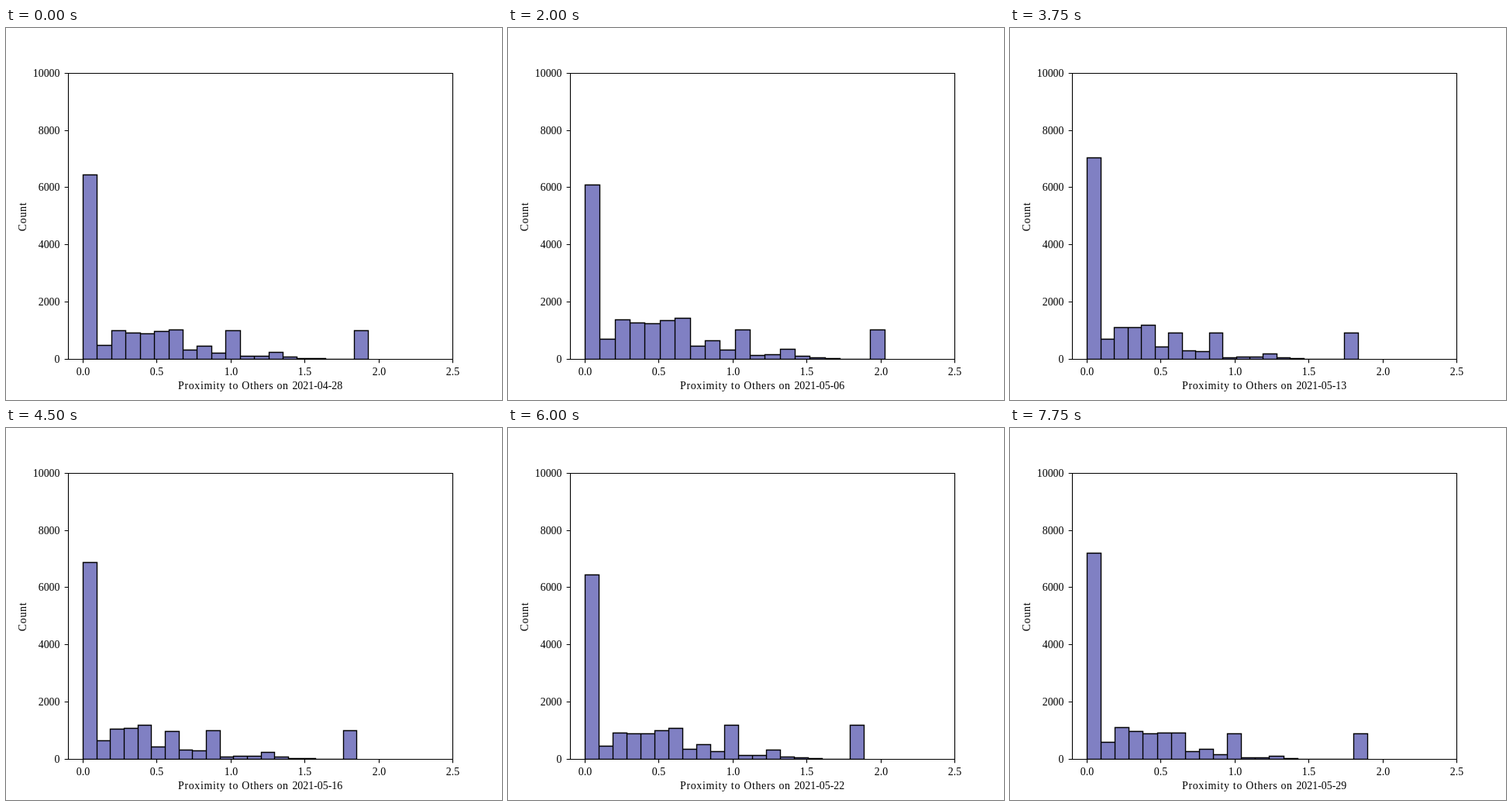
Write an HTML page that moves like this. It is 640 px wide and 480 px high and loops after 8 s.

```html
<!DOCTYPE html>
<html lang="en">
<head>
<meta charset="utf-8">
<title>Proximity histogram</title>
<style>
  html, body { margin: 0; width: 640px; height: 480px; overflow: hidden; background: #fff; }
  svg { display: block; }
  text { font: 13.9px "Liberation Serif", serif; fill: #000; }
  .words { letter-spacing: .049em; }
  .axis { fill: none; stroke: #000; stroke-width: 1.11; }
  .bars { fill: #8080c3; stroke: #000; stroke-width: 1.39; }
</style>
</head>
<body>
<svg width="640" height="480" viewBox="0 0 640 480">
  <clipPath id="plot"><rect x="80" y="57.6" width="496" height="369.6"/></clipPath>
  <g clip-path="url(#plot)"><path id="bars" class="bars"/></g>
  <path id="axis" class="axis"/>
  <g id="labels"></g>
  <text class="words" x="222" y="466">Proximity to Others on</text>
  <text id="date" x="369.4" y="466"></text>
  <text class="words" text-anchor="middle" transform="translate(25.5 243.5) rotate(-90)">Count</text>
</svg>
<script>
const STEP = 250, DAYS = 32, BINS = 20;
const START = Date.UTC(2021, 3, 28);

// Shape of the bins between the first one and the echo at half range
const WIDE = [510, 1010, 930, 920, 985, 1050, 335, 470, 235];
const NARROW = [650, 1060, 1090, 1200, 450, 970, 335, 300];

// gain scales the middle bins, tilt moves weight towards the left
const keys = [
  { day: 0, max: 1.931, first: 6450, last: 1005, gain: .99, tilt: 0 },
  { day: 5, max: 2.297, first: 6220, last: 925, gain: 1.28, tilt: .2 },
  { day: 8, max: 2.029, first: 6090, last: 1040, gain: 1.37, tilt: 0 },
  { day: 15, max: 1.834, first: 7040, last: 925, gain: .97, tilt: .15 },
  { day: 21, max: 1.868, first: 6690, last: 1085, gain: 1.03, tilt: -.15 },
  { day: 27, max: 1.91, first: 6200, last: 1300, gain: 1, tilt: -.15 },
  { day: 31, max: 1.898, first: 7200, last: 895, gain: .93, tilt: .3 }
];

const $ = id => document.getElementById(id);
const snap = v => Math.floor(v + .5) + .5;
const px = v => snap(80 + (v + .1) / 2.6 * 496);
const py = v => snap(427.2 - v / 10000 * 369.6);

function addLabel(str, x, y, anchor) {
  const el = document.createElementNS("http://www.w3.org/2000/svg", "text");
  el.setAttribute("x", x);
  el.setAttribute("y", y);
  el.setAttribute("text-anchor", anchor);
  el.textContent = str;
  $("labels").append(el);
}

function drawAxes() {
  let d = "M80.5 58.5H576.5V427.5H80.5Z";
  for (let v = 0; v <= 2.5; v += .5) {
    d += `M${px(v)} 427.5v4.86`;
    addLabel(v.toFixed(1), px(v), 448, "middle");
  }
  for (let v = 0; v <= 10000; v += 2000) {
    d += `M80.5 ${py(v)}h-4.86`;
    addLabel(v, 69.5, py(v) + 4.5, "end");
  }
  $("axis").setAttribute("d", d);
}

function stateAt(day) {
  const i = Math.max(1, keys.findIndex(k => k.day >= day));
  const a = keys[i - 1], b = keys[i];
  const k = (day - a.day) / (b.day - a.day);
  return Object.fromEntries(Object.keys(a).map(p => [p, a[p] + (b[p] - a[p]) * k]));
}

// Low hump after the echo, with one taller bin
const tail = n => 120 * Math.exp(-(((n - 12) / 3) ** 2)) + (n === 13 ? 155 : 0);

function countAt(n, s) {
  const head = s.max < 1.88 ? NARROW : WIDE;
  const echo = head.length + 1;
  if (n === 0) return s.first;
  if (n === echo || n === BINS - 1) return s.last;
  if (n === BINS - 2) return 0;
  const base = n < echo ? head[n - 1] : tail(n);
  return base * s.gain * (1 + s.tilt * (5 - n) / 5);
}

function drawDay(day) {
  const s = stateAt(day), width = s.max / BINS;
  let d = "";
  for (let n = 0; n < BINS; n++) {
    d += `M${px(n * width)} ${py(0)}V${py(countAt(n, s))}H${px((n + 1) * width)}V${py(0)}Z`;
  }
  $("bars").setAttribute("d", d);
  $("date").textContent = new Date(START + day * 864e5).toISOString().slice(0, 10);
}

let shown = -1;
function tick() {
  const day = Math.floor(performance.now() / STEP) % DAYS;
  if (day !== shown) drawDay(shown = day);
  requestAnimationFrame(tick);
}

drawAxes();
tick();
</script>
</body>
</html>
```
